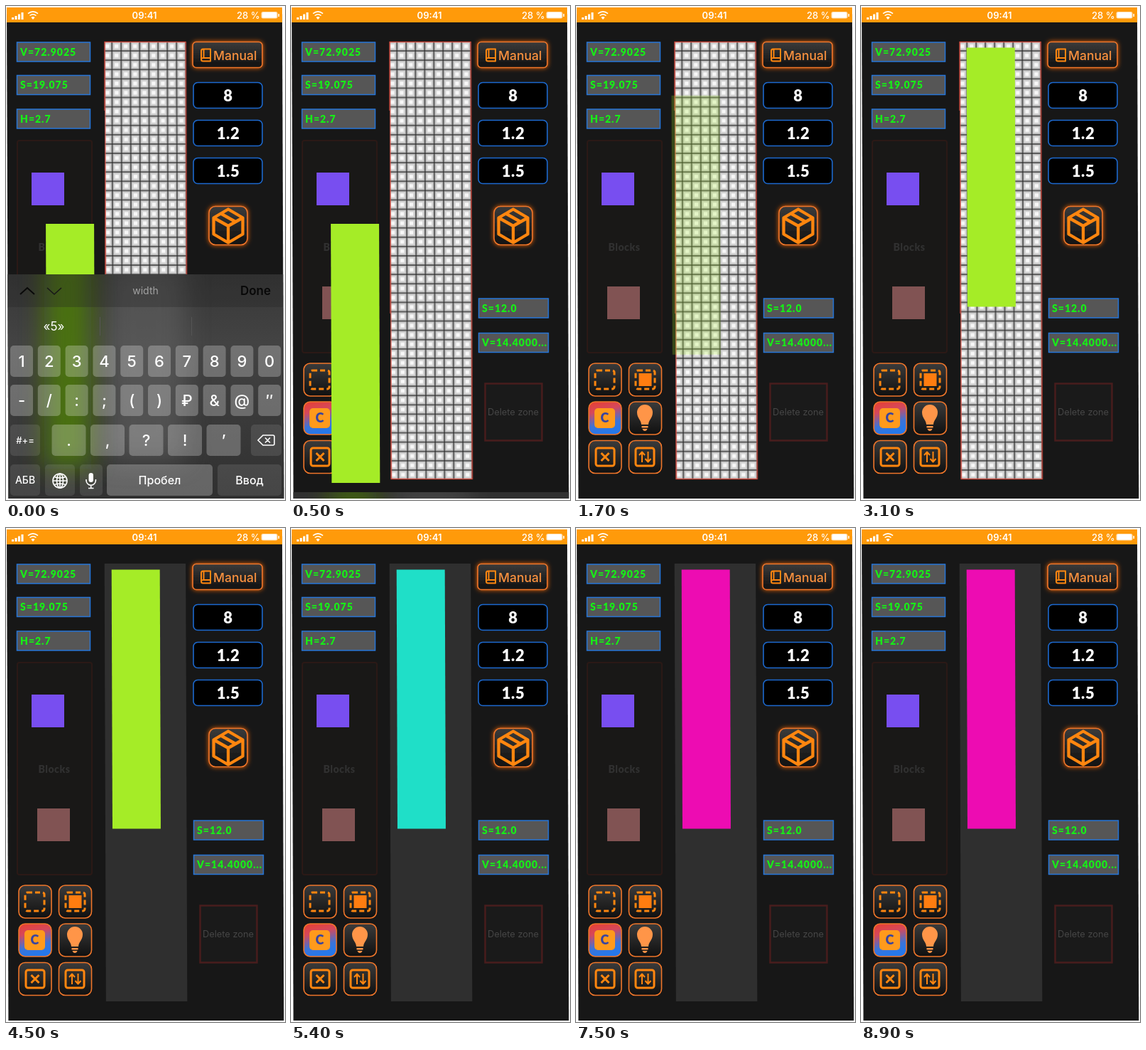
An HTML page for the animation above (9 s loop, 393x694 px).

```html
<!DOCTYPE html>
<html lang="en">
<head>
<meta charset="utf-8">
<title>Block builder</title>
<style>
html, body { margin: 0; width: 100%; height: 100%; overflow: hidden; background: #fff; }
svg { display: block; width: 100vw; height: 100vh; }
text { font-family: Inter, "Open Sans", sans-serif; }
.mid { text-anchor: middle; }
.geo { font-family: Lato, sans-serif; font-weight: 900; }
.info rect { width: 103px; height: 27px; fill: #565656; stroke: #2675d8; stroke-width: 1.5; }
.info.narrow rect { width: 98px; }
.info text { font-size: 14px; letter-spacing: 1px; fill: #16f016; }
.field rect { width: 97px; height: 36px; rx: 6px; fill: #000; stroke: #1c69cf; stroke-width: 1.6; }
.field text { font-size: 22px; letter-spacing: .6px; fill: #fff; }
.btn { fill: url(#dark); stroke: #f0762a; stroke-width: 1.6; }
.btn.colors { fill: url(#colors); }
.glow { filter: url(#halo); }
.line { fill: none; stroke: #ff860f; stroke-width: 3; stroke-linejoin: round; }
.line.thin { stroke-width: 2; }
.line.bold { stroke-width: 4.3; }
.key { fill: #fff; fill-opacity: .25; }
.key.dim { fill-opacity: .1; }
.keys text, .keys .ink { fill: #fff; }
.stroke { fill: none; stroke: #fff; stroke-width: 1.6; }

.block { animation: move 9s linear infinite, fade 9s linear infinite, tint 9s linear infinite; }
.grid { animation: grid 9s linear infinite; }
.keyboard { animation: dismiss 9s infinite; }

@keyframes move {
  0%, 11% { transform: translate(55px, 306px); }
  12.22% { transform: translate(56px, 301px); }
  15% { transform: translate(88px, 222px); }
  18.89% { transform: translate(134px, 126px); }
  22.5% { transform: translate(146px, 70px); }
  25%, 100% { transform: translate(148.5px, 58.5px); }
}
@keyframes fade {
  0%, 9.5% { opacity: 1; }
  11.5%, 25% { opacity: .23; }
  27%, 100% { opacity: 1; }
}
@keyframes tint {
  0%, 59.99% { fill: #a5ec27; }
  60%, 83.32% { fill: #1fdfc8; }
  83.33%, 100% { fill: #ed0cb2; }
}
@keyframes grid {
  0%, 42.21% { opacity: 1; }
  42.22%, 100% { opacity: 0; }
}
@keyframes dismiss {
  0%, 2.5% { transform: none; animation-timing-function: cubic-bezier(.3, 0, .3, 1); }
  6.5%, 100% { transform: translateY(320px); }
}
</style>
</head>
<body>
<svg viewBox="0 0 393 694" preserveAspectRatio="none">
  <defs>
    <linearGradient id="dark" x2="0" y2="1">
      <stop stop-color="#3b3b3b"/><stop offset="1" stop-color="#101010"/>
    </linearGradient>
    <linearGradient id="colors" x2=".25" y2="1">
      <stop stop-color="#e84030"/><stop offset=".35" stop-color="#d5485c"/>
      <stop offset=".75" stop-color="#3c74d8"/><stop offset="1" stop-color="#2678ea"/>
    </linearGradient>
    <linearGradient id="board" x2="0" y2="1">
      <stop stop-color="#373737"/><stop offset=".3" stop-color="#434343"/><stop offset="1" stop-color="#303030"/>
    </linearGradient>
    <filter id="halo" x="-30%" y="-40%" width="160%" height="180%">
      <feDropShadow dx="0" dy="0" stdDeviation="3" flood-color="#ff6a10" flood-opacity=".9"/>
    </filter>
    <filter id="soft" x="-80%" y="-30%" width="260%" height="160%"><feGaussianBlur stdDeviation="17"/></filter>
    <pattern id="cells" x="149" y="50" width="13" height="13.085" patternUnits="userSpaceOnUse">
      <path fill="#262626" d="M0 0h13v13.1H0z"/>
      <path fill="#bababa" d="M.6 .6h11.8v11.9H.6z"/>
      <path fill="#d6d6d6" d="M2 2h9v9H2z"/>
      <path fill="#f8f8f8" d="M4 4h5v5H4z"/>
    </pattern>
    <clipPath id="screen"><path d="M1 2H389L391.4 692H3.4z"/></clipPath>
  </defs>

  <g clip-path="url(#screen)">
    <path fill="#171717" d="M0 0h393v694H0z"/>
    <path fill="#ff9a0a" d="M0 0h393v23H0z"/>
    <g fill="#fff">
      <path d="M8 16h3v3H8zM12.5 14h3v5h-3zM17 11.5h3V19h-3zM21.5 9h3v10h-3z"/>
      <path d="M38 19l-2.6-3q2.6-2 5.2 0z"/>
      <path class="stroke" d="M33.5 13.5q4.500-3.600 9 0M31 10.700q7-5.800 14 0"/>
      <text class="mid" x="195" y="17.5" font-size="13" font-weight="600">09:41</text>
      <text x="325" y="17.5" font-size="13" font-weight="500">28 %</text>
      <rect x="359.5" y="8" width="23" height="9.5" rx="2.5" opacity=".7"/>
      <rect x="361" y="9" width="20" height="7.5" rx="1.5"/>
      <path d="M383.500 11h1.500v4h-1.500z"/>
    </g>

    <g id="info"></g>
    <g id="fields"></g>

    <rect x="16" y="189" width="105" height="298" rx="3" fill="#191817" stroke="#2b1916" stroke-width="2"/>
    <text class="mid geo" x="68" y="344" font-size="14" letter-spacing=".5" fill="#303030">Blocks</text>
    <path fill="#784ef0" d="M36 234h46v46H36z"/>
    <path fill="#815353" d="M44 394h46v46H44z"/>

    <rect class="btn glow" x="263" y="50.5" width="98" height="36" rx="5"/>
    <path class="line thin" d="M288 73V60.500H277.500q-2.500 0-2.500 2.500V75q0 2.500 2.500 2.500H288V73H277.500q-2.500 0-2.500 2M278.500 60.500V73"/>
    <text x="292" y="75.5" font-size="17.5" font-weight="500" fill="#fb923f">Manual</text>

    <rect class="btn glow" x="286" y="281.5" width="54" height="54" rx="9"/>
    <path class="line bold" d="M313 285.500L333.500 297.500V320.500L313 332.500L292.500 320.500V297.500zM292.500 297.500L313 309L333.500 297.500M313 309V332.500M302.500 291.500L323 303"/>

    <rect x="273.5" y="530.5" width="80" height="80" fill="#1a1a1a" stroke="#481d1d" stroke-width="2.5"/>
    <text class="mid" x="313" y="575" font-size="12.8" fill="#464646">Delete zone</text>

    <g id="buttons"></g>
    <rect class="line" x="27" y="512" width="27" height="26" rx="3" stroke-dasharray="7 4"/>
    <rect class="line" x="84" y="512" width="27" height="26" rx="3" stroke-dasharray="7 4"/>
    <path fill="#ff7d10" d="M88.500 516h18v18h-18z"/>
    <rect x="26" y="565" width="29" height="28" rx="5" fill="#ff9a1c"/>
    <text class="mid geo" x="40.5" y="585" font-size="18" fill="#3a45a0">C</text>
    <path fill="#ff9548" d="M92 588C92 582 86 579 86 571a11 11 0 0 1 22 0C108 579 102 582 102 588zM92.500 590h9v2.500h-9zM93.500 594h7q-1 3-3.500 3t-3.500-3z"/>
    <rect class="line" x="28" y="621" width="26" height="25" rx="3"/>
    <path class="line" d="M35.500 628l11 11M46.500 628l-11 11"/>
    <rect class="line" x="84" y="621" width="26" height="25" rx="3"/>
    <path class="line thin" d="M93 641V627M89 631l4-4.500 4 4.500M101.500 626v14M97.500 636l4 4.500 4-4.500"/>

    <g transform="matrix(1 0 .0035 1 0 0)">
      <path fill="#2f2f2f" d="M138.500 50h114.500v615H138.500z"/>
      <rect class="grid" x="139" y="50.5" width="114" height="614" fill="url(#cells)" stroke="#d8493c" stroke-width="1.3"/>
      <rect class="block" width="68" height="364"/>
    </g>

    <g class="keyboard">
      <path fill="url(#board)" d="M0 377h393v317H0z"/>
      <svg x="0" y="377" width="393" height="317" viewBox="0 377 393 317">
        <path filter="url(#soft)" fill="#666" opacity=".55" d="M142 360h110v280H142z"/>
        <path filter="url(#soft)" fill="#4c7408" opacity=".95" d="M54 350h66v300H54z"/>
      </svg>
      <path fill="#222" fill-opacity=".3" d="M0 377h393v46H0z"/>
      <path fill="none" stroke="#090909" stroke-width="2" d="M20 405l10-9 10 9"/>
      <path fill="none" stroke="#181818" stroke-width="1.6" d="M58 396l10 9 10-9"/>
      <text class="mid" x="196.5" y="405" font-size="14" fill="#a2a2a2">width</text>
      <text class="mid" x="351.5" y="406" font-size="17" font-weight="600" fill="#080808">Done</text>
      <path stroke="#555" d="M132.500 437v26M261.500 437v26"/>
      <g class="keys">
        <text class="mid" x="67.5" y="456" font-size="17">«5»</text>
        <g id="keys"></g>
        <path class="stroke" d="M355 610l7-7h14q2 0 2 2v10q0 2-2 2H362zM365 606.500l7 7M372 606.500l-7 7"/>
        <g class="stroke">
          <circle cx="76" cy="667" r="10"/>
          <ellipse cx="76" cy="667" rx="4.5" ry="10"/>
          <path d="M66 667h20M76 657v20M68 661.500q8 3 16 0M68 672.500q8-3 16 0"/>
        </g>
        <rect class="ink" x="116.5" y="656" width="6.5" height="13" rx="3.25"/>
        <path class="stroke" d="M113 665v1.500a6.700 6.700 0 0 0 13.400 0V665M119.700 673.500v4M116 677.500h7.500"/>
      </g>
    </g>
  </g>
</svg>
<script>
const add = (id, markup) => document.getElementById(id).insertAdjacentHTML("beforeend", markup);

const info = (x, y, label, kind = "") => add("info",
  `<g class="info ${kind}"><rect x="${x}" y="${y}"/><text class="geo" x="${x + 4.5}" y="${y + 18.5}">${label}</text></g>`);
info(15.5, 51, "V=72.9025");
info(15.5, 97.5, "S=19.075");
info(15.5, 145, "H=2.7");
info(264.5, 411, "S=12.0", "narrow");
info(264.5, 459.5, "V=14.4000...", "narrow");

["8", "1.2", "1.5"].forEach((value, i) => {
  const y = 107.5 + 53 * i;
  add("fields", `<g class="field"><rect x="264" y="${y}"/><text class="mid geo" x="313" y="${y + 26}">${value}</text></g>`);
});

[502, 556, 610.5].forEach((y, row) => [18, 74.5].forEach((x, col) => {
  const kind = row === 1 && col === 0 ? "colors" : "";
  add("buttons", `<rect class="btn ${kind}" x="${x}" y="${y}" width="46" height="46" rx="9"/>`);
}));

const key = (x, y, w, label, size = 22, kind = "") => add("keys",
  `<rect class="key ${kind}" x="${x}" y="${y}" width="${w}" height="44" rx="5"/>
   <text class="mid" x="${x + w / 2}" y="${y + 22 + size * .36}" font-size="${size}" font-weight="500">${label}</text>`);
const keyRow = (x, y, w, pitch, labels) => labels.forEach((label, i) => key(x + pitch * i, y, w, label));

keyRow(6, 477, 32, 38.8, [..."1234567890"]);
keyRow(6, 532, 32, 38.8, ["-", "/", ":", ";", "(", ")", "₽", "&amp;", "@", "″"]);
keyRow(64.5, 588, 48, 54.5, [...".,?!’"]);
key(6, 588, 42, "#+=", 13, "dim");
key(345, 588, 43, "", 14, "dim");
key(6, 644, 42, "АБВ", 14, "dim");
key(55, 644, 42, "", 14, "dim");
key(104, 644, 32, "", 14, "dim");
key(142, 644, 149, "Пробел", 16);
key(298, 644, 90, "Ввод", 16, "dim");
</script>
</body>
</html>
```
